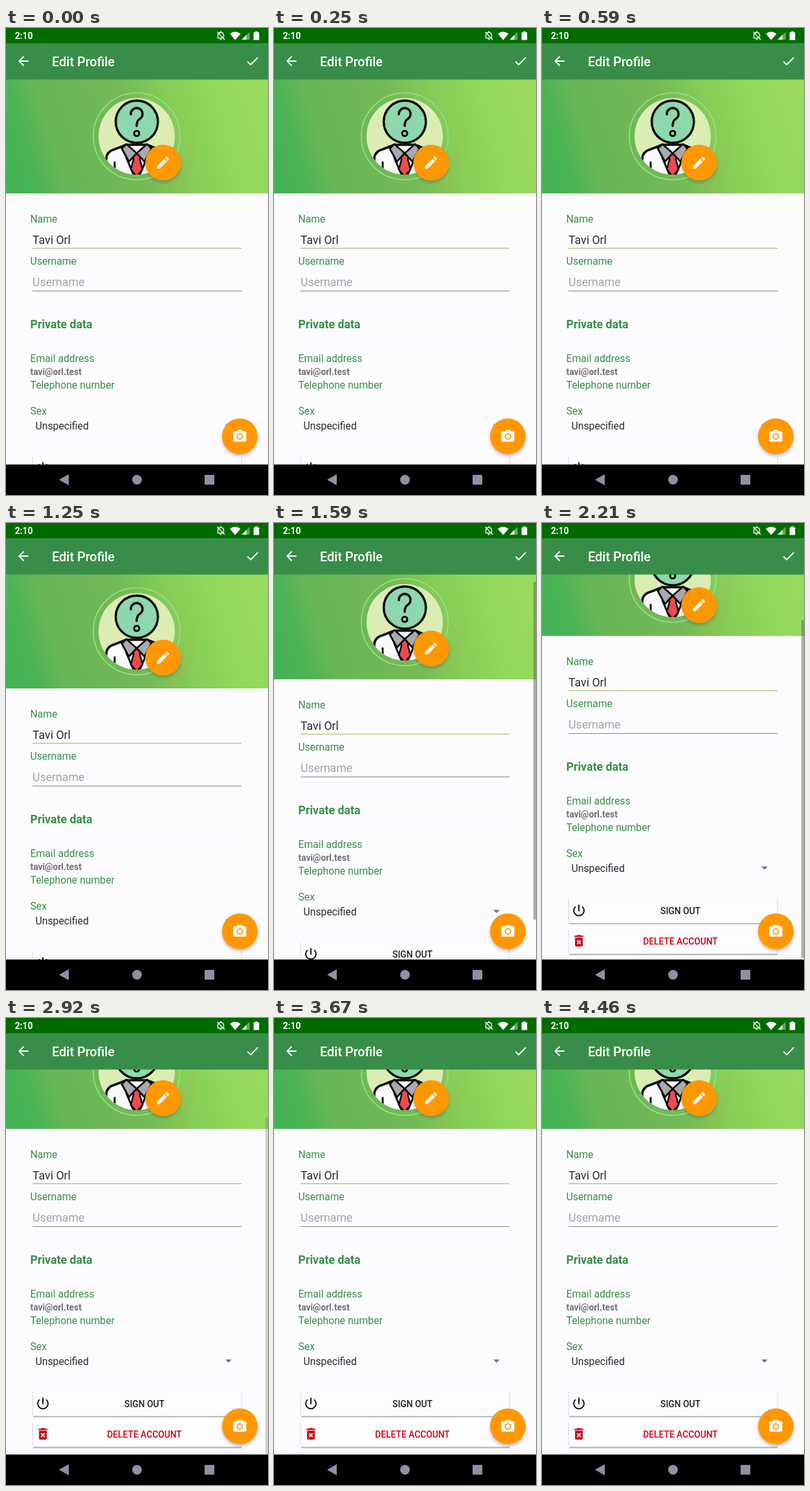
These frames come from a looping animation (405x720 px, 4500 ms). An HTML page:

```html
<!DOCTYPE html>
<html lang="en">
<head>
<meta charset="utf-8">
<title>Edit profile</title>
<style>
  html, body { margin: 0; width: 100%; height: 100%; overflow: hidden; background: #000; }
  svg { display: block; width: 100%; height: 100%; font-family: Roboto, sans-serif; }
  .label { font-size: 15.76px; fill: #388e45; }
  .field { font-size: 17.73px; fill: #2a2a2e; }
  .value { font-size: 15.76px; fill: #2a2a2e; }
  .button { font-size: 13.8px; font-weight: 500; text-anchor: middle; }
  .divider { stroke: #f5f8fb; }
  .ink { fill: none; stroke: #0b0b0b; stroke-width: 3.6; stroke-linejoin: round; stroke-linecap: round; }
</style>
</head>
<body>
<svg viewBox="0 0 405 720">
  <defs>
    <linearGradient id="meadow" gradientUnits="userSpaceOnUse" x1="0" y1="225" x2="405" y2="104">
      <stop offset="0" stop-color="#43b356"/>
      <stop offset=".1" stop-color="#4cb456"/>
      <stop offset=".2" stop-color="#68b656"/>
      <stop offset=".48" stop-color="#74b956"/>
      <stop offset=".64" stop-color="#84cc57"/>
      <stop offset=".8" stop-color="#90d95a"/>
      <stop offset="1" stop-color="#9bd960"/>
    </linearGradient>
    <linearGradient id="streak">
      <stop offset="0" stop-color="#a0b950" stop-opacity="0"/>
      <stop offset=".5" stop-color="#a0b950" stop-opacity=".3"/>
      <stop offset="1" stop-color="#a0b950" stop-opacity="0"/>
    </linearGradient>
    <clipPath id="page"><rect y="79" width="405" height="594"/></clipPath>
    <clipPath id="disc"><circle cx="202" cy="167" r="59"/></clipPath>
    <filter id="lift" x="-30%" y="-30%" width="160%" height="170%">
      <feDropShadow dx="0" dy="3" stdDeviation="2.2" flood-color="#30305c" flood-opacity=".3"/>
    </filter>
    <g id="card">
      <rect x="41" width="323" height="37" fill="#fdfdff"/>
      <path d="M41 0V36M364 0V36" stroke="#cfcfec"/>
      <path d="M42 37.5H364" stroke="#a3aaa6" stroke-width="1.6"/>
      <path d="M43 39H364" stroke="#dfe3e4"/>
    </g>
  </defs>

  <rect y="79" width="405" height="594" fill="#fcfcff"/>
  <g clip-path="url(#page)">
    <g id="content">
      <rect y="79" width="405" height="176" fill="url(#meadow)"/>
      <path d="M236 255Q276 205 290 150H306Q300 215 268 255Z" fill="url(#streak)"/>

      <circle cx="202" cy="167" r="67" fill="none" stroke="#98e08a" stroke-width="1.6"/>
      <circle cx="202" cy="167" r="59" fill="#dcedb4"/>
      <g clip-path="url(#disc)">
        <path class="ink" style="fill:#fbfbff" d="M155 232V201Q156 190 168 187L186 180H218L236 187Q248 190 249 201V232Z"/>
        <path class="ink" style="stroke-width:3" d="M168 207V230M236 207V230M186 200L197 226M218 200L207 226"/>
        <path class="ink" style="fill:#ef4a50;stroke-width:2.6" d="M196 194H208L207 203 211 218 202 229 193 218 197 203Z"/>
        <path class="ink" style="fill:#a9a9b0;stroke-width:2.8" d="M186 179L202 193 190 206 179 186ZM218 179L202 193 214 206 225 186Z"/>
        <circle class="ink" style="fill:#8ed8ae" cx="202.2" cy="144.5" r="32.6"/>
        <path class="ink" d="M193 133A9 9 0 1 1 207 140Q202 143 202 151"/>
        <circle class="ink" style="stroke-width:3" cx="202" cy="162.5" r="4"/>
      </g>
      <circle cx="243" cy="207.5" r="27.6" fill="#ff9800" filter="url(#lift)"/>
      <path transform="translate(230.6 195.4) scale(1.02)" fill="#fff" d="M3 17.25V21h3.75L17.81 9.94l-3.75-3.75L3 17.25zM20.71 7.04c.39-.39.39-1.02 0-1.41l-2.34-2.34c-.39-.39-1.02-.39-1.41 0l-1.83 1.83 3.75 3.75 1.83-1.83z"/>

      <text class="label" x="37.5" y="299.5">Name</text>
      <text class="field" x="41" y="332.5">Tavi Orl</text>
      <path d="M41 339.5H364" stroke="#a3b45c"/>
      <text class="label" x="37.5" y="365">Username</text>
      <text class="field" x="41" y="398" style="fill:#a3a2a8">Username</text>
      <path d="M41 405.5H364" stroke="#85858a"/>

      <path class="divider" d="M37 429.5H368M37 482.5H368M37 639.5H368"/>
      <text class="label" x="37.5" y="463" style="font-size:17.73px;font-weight:700">Private data</text>
      <text class="label" x="37.5" y="515">Email address</text>
      <text x="37.5" y="534.5" font-size="13.8" font-weight="700" fill="#717176">tavi@orl.test</text>
      <text class="label" x="37.5" y="555.5">Telephone number</text>
      <text class="label" x="37.5" y="596">Sex</text>
      <text class="value" x="45.5" y="618.5">Unspecified</text>
      <path d="M339 610.5H349L344 615.5Z" fill="#74747c"/>

      <use href="#card" y="661"/>
      <path transform="translate(45.2 666.6) scale(.985)" fill="#111" d="M13 3h-2v10h2V3zm4.83 2.17l-1.42 1.42C17.99 7.86 19 9.81 19 12c0 3.87-3.13 7-7 7s-7-3.13-7-7c0-2.19 1.01-4.14 2.58-5.42L6.17 5.17C4.23 6.82 3 9.26 3 12c0 4.97 4.03 9 9 9s9-4.03 9-9c0-2.74-1.23-5.18-3.17-6.83z"/>
      <text class="button" x="214" y="683.6" fill="#202024">SIGN OUT</text>
      <use href="#card" y="708.5"/>
      <path transform="translate(45.2 713.4) scale(.985)" fill="#d3000f" d="M6 19c0 1.1.9 2 2 2h8c1.1 0 2-.9 2-2V7H6v12zm2.46-7.12l1.41-1.41L12 12.59l2.12-2.12 1.41 1.41L13.41 14l2.12 2.12-1.41 1.41L12 15.41l-2.12 2.12-1.41-1.41L10.59 14l-2.13-2.12zM15.5 4l-1-1h-5l-1 1H5v2h14V4z"/>
      <text class="button" x="214" y="730.6" fill="#d3000f">DELETE ACCOUNT</text>
    </g>
    <rect id="thumb" x="401" y="79" width="4" height="520.5" fill="#5c6450" fill-opacity=".5"/>
    <circle cx="361.5" cy="629.5" r="27.6" fill="#ff9800" filter="url(#lift)"/>
    <g transform="translate(349.5 617.7)" fill="#fff">
      <path d="M9 2L7.17 4H4c-1.1 0-2 .9-2 2v12c0 1.1.9 2 2 2h16c1.1 0 2-.9 2-2V6c0-1.1-.9-2-2-2h-3.17L15 2H9zm3 15c-2.76 0-5-2.24-5-5s2.24-5 5-5 5 2.24 5 5-2.24 5-5 5z"/>
      <circle cx="12" cy="12" r="3.2"/>
    </g>
  </g>

  <!-- app bar -->
  <rect y="23" width="405" height="56.5" fill="#388e48"/>
  <g fill="#fff">
    <path transform="translate(15 39.2) scale(.985)" d="M20 11H7.83l5.59-5.59L12 4l-8 8 8 8 1.41-1.41L7.83 13H20v-2z"/>
    <text x="71" y="58.7" font-size="19.9" font-weight="500">Edit Profile</text>
    <path transform="translate(369.3 39.2) scale(.985)" d="M9 16.17L4.83 12l-1.42 1.41L9 19 21 7l-1.41-1.41z"/>
  </g>

  <!-- status bar -->
  <rect width="405" height="23.5" fill="#006c00"/>
  <g fill="#fff">
    <text x="13.7" y="17" font-size="13.8" font-weight="700">2:10</text>
    <path d="M327.5 15.5H336.5V11Q336.5 7 332 7T327.5 11ZM326.5 6L338 18" fill="none" stroke="#fff" stroke-width="1.3"/>
    <path d="M330.5 17H333.5A1.5 1.5 0 0 1 330.5 17ZM331 5H333V7H331Z"/>
    <path d="M346 9Q354.2 2.6 362.5 9L354.2 18.6Z"/>
    <path d="M364.5 18V17.5L376.5 6V18Z" opacity=".4"/>
    <path d="M364.5 18L371.5 11V18Z"/>
    <path d="M382.7 6.7H385.2V5.2H388.8V6.7H391.3V18.6H382.7Z"/>
  </g>

  <!-- navigation bar -->
  <rect y="673" width="405" height="47" fill="#000"/>
  <g fill="#918fa6">
    <path d="M82 696.5L97 688V705Z"/>
    <circle cx="202.5" cy="696.5" r="7.5"/>
    <rect x="307" y="689" width="15" height="15" rx="1"/>
  </g>
</svg>
<script>
  const LOOP = 4500, SCROLL_START = 1333, SCROLL_TIME = 1174, DISTANCE = 84;
  const FADE_START = 2810, FADE_TIME = 250;
  const content = document.getElementById('content');
  const thumb = document.getElementById('thumb');
  const clamp = v => Math.min(1, Math.max(0, v));

  // cubic-bezier(.4, 0, .2, 1)
  function ease(x) {
    let low = 0, high = 1, u = .5;
    for (let i = 0; i < 24; i++) {
      u = (low + high) / 2;
      const at = 1.2 * u * (1 - u) ** 2 + .6 * u * u * (1 - u) + u ** 3;
      if (at < x) low = u; else high = u;
    }
    return u * u * (3 - 2 * u);
  }

  function draw(now) {
    const t = now % LOOP;
    const scroll = Math.round(DISTANCE * ease(clamp((t - SCROLL_START) / SCROLL_TIME)));
    content.setAttribute('transform', `translate(0 ${-scroll})`);
    thumb.setAttribute('transform', `translate(0 ${Math.round(scroll * 594 / 678)})`);
    thumb.setAttribute('opacity', t < SCROLL_START ? 0 : 1 - clamp((t - FADE_START) / FADE_TIME));
    requestAnimationFrame(draw);
  }
  draw(0);
</script>
</body>
</html>
```
